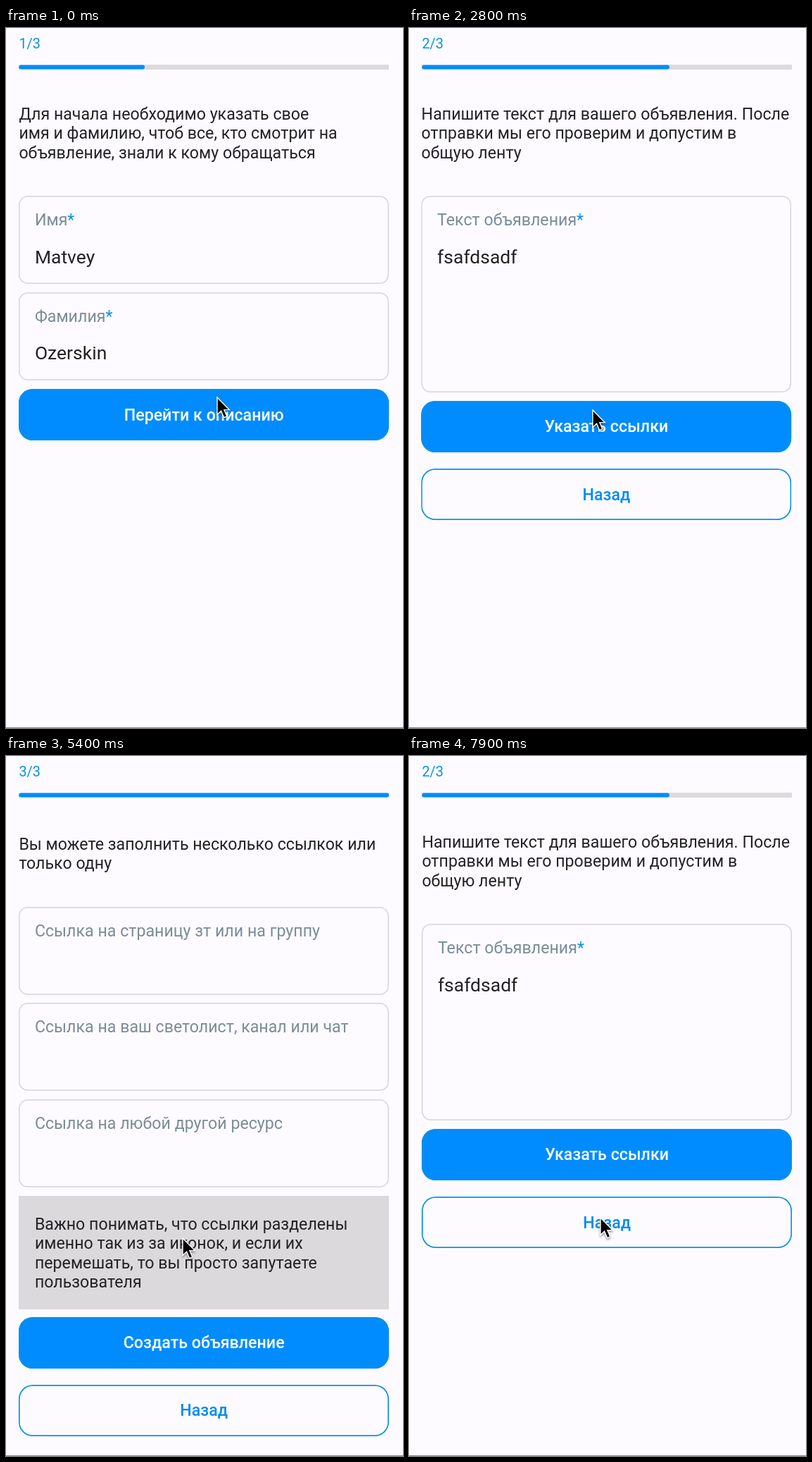
An HTML page that plays this animation: 564x993 px, repeating every 8000 ms.

```html
<!DOCTYPE html>
<html lang="ru">
<head>
<meta charset="utf-8">
<title>Новое объявление</title>
<style>
:root { --blue: #008cff; --link: #0a91e4; --edge: #dbd9de; --loop: 8s infinite; }
* { box-sizing: border-box; }
html, body { margin: 0; width: 100%; height: 100%; overflow: hidden; background: #fdfbff; }
body { position: relative; font: 23.2px/27.5px Roboto, sans-serif; color: #222225; }
#stage { position: absolute; left: 0; top: 0; width: 564px; height: 993px; overflow: hidden; }
#stage div, #stage p, #stage svg { position: absolute; margin: 0; }

/* header */
.step { left: 18.4px; top: 10.6px; width: 60px; height: 24px; overflow: hidden; font-size: 19.9px; line-height: 24px; color: var(--link); }
#stage .step span { display: block; animation: step var(--loop) step-end; }
.track { left: 18.4px; top: 52px; width: 525.6px; height: 7px; background: #dcdadd; clip-path: inset(.4px 0); }
.bar { left: 0; top: 0; height: 100%; background: var(--blue); clip-path: inset(.4px 0 round 3px); animation: bar var(--loop) ease-in-out; }

/* pages */
.strip { left: 0; top: 0; width: 1692px; height: 993px; animation: strip var(--loop) ease; }
.page { top: 0; width: 564px; height: 993px; overflow: hidden; clip-path: inset(75px 0 0 0); }
.page:nth-child(2) { left: 564px; }
.page:nth-child(3) { left: 1128px; }
.scroll { left: 0; top: 0; width: 564px; height: 1080px; animation: scroll var(--loop) ease-in-out; }
.page p { left: 18.4px; top: var(--y); white-space: nowrap; }
.field, .note, .btn { left: 18.4px; top: var(--y); width: 525.6px; }
.field { height: 125px; box-shadow: inset 0 0 0 1.7px var(--edge); border-radius: 13px; }
.field.tall { height: 279px; }
.field p, .note p { left: 22.5px; }
.field .name { top: 21px; color: #7b8c99; }
.field b { font-weight: 400; color: var(--link); }
.field .value { top: 70.3px; font-size: 26.5px; line-height: 31.4px; }
.note { height: 160.5px; background: #dbd9dc; }
.note p { top: 26.5px; }
.btn { height: 72.5px; padding-top: 1.6px; border-radius: 20px; box-shadow: inset 0 0 0 1.7px var(--link); display: flex; align-items: center; justify-content: center; background: var(--blue); color: #fff; font-weight: 500; }
.btn.back { background: none; color: #008cf2; }
.pressed { animation: press var(--loop) step-end; }
.typing { text-decoration-line: underline; text-decoration-thickness: 1.7px; text-underline-offset: 4px; animation: typing var(--loop) step-end; }
.handle { left: 140px; top: 340px; animation: focus var(--loop) step-end; }

.floor { left: 0; top: 992px; width: 564px; height: 1px; background: #858588; }
#keys { left: 0; top: 650px; animation: keys var(--loop) ease-out; }
.pointer { left: 0; top: 0; overflow: visible; filter: drop-shadow(0 2px 1.5px #0006); animation: pointer var(--loop) ease-in-out; }

@keyframes step {
  0% { transform: none; }
  8.75% { transform: translateY(-24px); }
  36.25% { transform: translateY(-48px); }
  83.75%, 100% { transform: translateY(-24px); }
}
@keyframes bar {
  0%, 9.375% { width: 34%; }
  21.875%, 36.875% { width: 66.9%; }
  49.375%, 84.375% { width: 100%; }
  96.875%, 100% { width: 66.9%; }
}
@keyframes strip {
  0%, 8.75% { transform: none; }
  12.5%, 35% { transform: translateX(-564px); }
  38.75%, 83.75% { transform: translateX(-1128px); }
  87.5%, 100% { transform: translateX(-564px); }
}
@keyframes scroll {
  0%, 49.5% { transform: none; }
  53.75%, 55% { transform: translateY(-103px); }
  59.5%, 62.5% { transform: none; }
  67%, 100% { transform: translateY(-103px); }
}
@keyframes keys {
  0%, 20% { transform: translateY(343px); }
  22.5%, 30% { transform: none; }
  32.5%, 100% { transform: translateY(343px); }
}
@keyframes focus {
  0%, 30.5%, 100% { visibility: hidden; }
  19.5% { visibility: visible; }
}
@keyframes typing {
  0%, 31.25%, 100% { text-decoration-color: transparent; }
  20% { text-decoration-color: currentColor; }
}
@keyframes press {
  0%, 83.75%, 100% { color: #008cf2; }
  79% { color: #0a52a6; }
}
@keyframes pointer {
  0%, 7.5% { transform: translate(300px, 524px); }
  15%, 20% { transform: translate(251px, 374px); }
  26.25%, 36.25% { transform: translate(261px, 542px); }
  40%, 43.75% { transform: translate(261px, 550px); }
  48.5%, 49.5% { transform: translate(251px, 787px); }
  53.75%, 55% { transform: translate(251px, 684px); }
  59.5%, 62.5% { transform: translate(251px, 787px); }
  67%, 69% { transform: translate(251px, 684px); }
  77.5%, 83.75% { transform: translate(251px, 912px); }
  90% { transform: translate(262px, 677px); }
  96.25%, 100% { transform: translate(272px, 655px); }
}
</style>
</head>
<body>
<div id="stage">
  <div class="strip">
    <div class="page">
      <p style="--y:108.7px">Для начала необходимо указать свое<br>имя и фамилию, чтоб все, кто смотрит на<br>объявление, знали к кому обращаться</p>
      <div class="field" style="--y:238.3px"><p class="name">Имя<b>*</b></p><p class="value">Matvey</p></div>
      <div class="field" style="--y:375.2px"><p class="name">Фамилия<b>*</b></p><p class="value">Ozerskin</p></div>
      <div class="btn" style="--y:512.3px">Перейти к описанию</div>
    </div>
    <div class="page">
      <p style="--y:108.7px">Напишите текст для вашего объявления. После<br>отправки мы его проверим и допустим в<br>общую ленту</p>
      <div class="field tall" style="--y:238.3px"><p class="name">Текст объявления<b>*</b></p><p class="value typing">fsafdsadf</p></div>
      <svg class="handle" width="30" height="36"><path d="M15 1 L25.5 11 A14.6 14.6 0 1 1 4.5 11 Z" fill="#008cff"/></svg>
      <div class="btn" style="--y:529.2px">Указать ссылки</div>
      <div class="btn back" style="--y:625.3px">Назад</div>
    </div>
    <div class="page">
      <div class="scroll">
        <p style="--y:108.7px">Отлично! Остался последний шаг! Вам нужно<br>указать как с вами можно связаться</p>
        <p style="--y:214.5px">Вы можете заполнить несколько ссылкок или<br>только одну</p>
        <div class="field" style="--y:316.5px"><p class="name">Ссылка на страницу зт или на группу</p></div>
        <div class="field" style="--y:453.3px"><p class="name">Ссылка на ваш светолист, канал или чат</p></div>
        <div class="field" style="--y:590.1px"><p class="name">Ссылка на любой другой ресурс</p></div>
        <div class="note" style="--y:727px"><p>Важно понимать, что ссылки разделены<br>именно так из за иконок, и если их<br>перемешать, то вы просто запутаете<br>пользователя</p></div>
        <div class="btn" style="--y:899.1px">Создать объявление</div>
        <div class="btn back pressed" style="--y:995.2px">Назад</div>
      </div>
    </div>
  </div>
  <div class="step"><span>1/3<br>2/3<br>3/3</span></div>
  <div class="track"><div class="bar"></div></div>
  <div class="floor"></div>
  <svg id="keys" width="564" height="343" viewBox="0 650 564 343" font-family="Roboto, sans-serif"></svg>
  <svg class="pointer" width="20" height="32"><path d="M0 0V24.5L5.6 19.2 9.6 28.6 13.8 26.8 9.9 17.6H17.3Z" fill="#000" stroke="#fff" stroke-width="1.4"/></svg>
</div>
<script>
const pitch = 56.5, keyWidth = 49.5;

const text = (x, y, size, str, extra = 'text-anchor="middle"') =>
  `<text x="${x}" y="${y}" font-size="${size}" ${extra}>${str}</text>`;

const key = (x, y, width = keyWidth, fill = '#fdfdfe') =>
  `<rect x="${x}" y="${y + 1.5}" width="${width}" height="59" rx="8" fill="#b4b7bd"/>` +
  `<rect x="${x}" y="${y}" width="${width}" height="59" rx="8" fill="${fill}"/>`;

const letters = (str, x, y) => [...str].map((c, i) => {
  const left = x + i * pitch;
  return key(left, y) + text(left + keyWidth / 2, y + 38.5, 32, c);
}).join('');

const digits = [...'1234567890'].map((c, i) =>
  text(43.8 + i * pitch, 739, 14.5, c, 'text-anchor="middle" font-weight="500" fill="#5b5e64"')).join('');

const line = (d, color = '#3c3f44', width = 2.8) =>
  `<path d="${d}" fill="none" stroke="${color}" stroke-width="${width}"/>`;

const gray = '#c2c6cd', soft = '#46494e';

const suggestions =
  '<circle cx="32" cy="683" r="22.5" fill="#c9ccd2"/><circle cx="32" cy="682" r="22.5" fill="#fff"/>' +
  line('M28 674l8.5 8-8.5 8') +
  text(66, 692, 26.5, 'fsafdsadf', `fill="${soft}"`) + line('M67 696.5h112', soft, 1.7) +
  line('M197 664v35M363 664v35', '#bfc2c8', 1.5) +
  `<g transform="translate(207 692) scale(.75 1)">${text(0, 0, 24.7, 'dsafdsa…fdsfsda', `fill="${soft}"`)}</g>` +
  '<rect x="533" y="668" width="10" height="18" rx="5" fill="#3c3f44"/>' +
  line('M528.5 680a9.3 9.3 0 0 0 18.6 0M537.8 690v6');

const controls =
  key(2, 870, 78, gray) + line('M40.5 886L26 901h7v13h15v-13h7Z') +
  key(482, 870, 79, gray) + line('M503 901l9-12.5h26v25h-26ZM518 895l12 12M530 895l-12 12') +
  key(2, 943.5, 78, gray) + text(40.5, 981.5, 20, '?123', 'text-anchor="middle" font-weight="500" fill="#33363b"') +
  key(86.2, 943.5, keyWidth, gray) + text(111, 987, 28, ',') +
  key(142.7, 943.5) + '<circle cx="167.5" cy="973.5" r="13.3" fill="none" stroke="#3c3f44" stroke-width="2.6"/>' +
  '<circle cx="162.5" cy="970" r="2" fill="#3c3f44"/><circle cx="172.5" cy="970" r="2" fill="#3c3f44"/>' +
  line('M160.5 976.5a7.4 6 0 0 0 14 0', '#3c3f44', 2.6) +
  key(199, 943.5, 220) +
  key(425.3, 943.5, keyWidth, gray) + text(450, 987, 28, '.') +
  key(482, 943.5, 79, '#0068e8') + line('M533.5 966v8.5h-24M515.5 967.5l-7 7 7 7', '#fff');

document.getElementById('keys').innerHTML =
  '<rect y="650" width="564" height="343" fill="#e2e4e9"/>' + suggestions +
  letters('qwertyuiop', 1.7, 723) + digits +
  letters('asdfghjkl', 30, 796.5) +
  letters('zxcvbnm', 86.2, 870) + controls;
</script>
</body>
</html>
```
